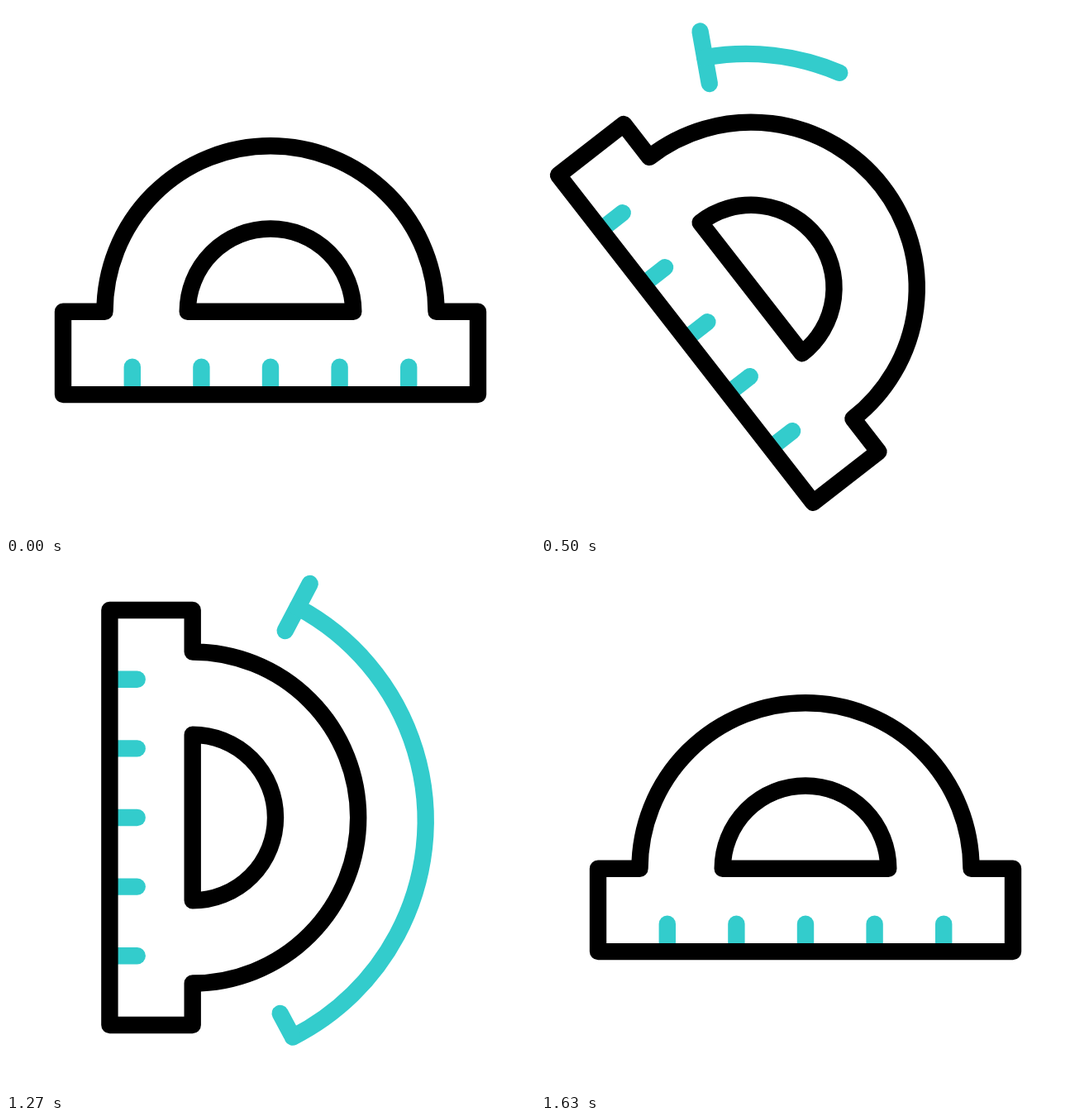
Animation, 640 px wide and 640 px high, one loop 1670 ms. Source, as an HTML page with a canvas:

```html
<!DOCTYPE html>
<html>
<head>
<meta charset="utf-8">
<style>
  html, body { margin: 0; width: 100%; height: 100%; overflow: hidden; background: #fff; }
  canvas { display: block; width: 100vw; height: 100vh; object-fit: contain; }
</style>
</head>
<body>
<canvas id="stage" width="640" height="640"></canvas>
<script>
const ctx = document.getElementById('stage').getContext('2d');
const LOOP = 1670, STEP = 100 / 3;
const BLACK = '#000', TEAL = '#33cccc';
const RAD = Math.PI / 180;

// Route of the middle of the ruler edge
const START = [320, 470], BEND = [81.7, 394.9], END = [125.5, 308];

// Angle gauge, relative to the centre of the protractor
const GAUGE = { x: 4, y: 11, r: 293, from: -151.9 * RAD, to: -26.8 * RAD };
const BAR = 64, ARC = GAUGE.r * (GAUGE.to - GAUGE.from), TOTAL = ARC + 2 * BAR;

const clamp = v => Math.min(1, Math.max(0, v));
const part = (t, a, b) => clamp((t - a) / (b - a));
const smooth = u => u * u * (3 - 2 * u);
const ease = (u, a, b) => 1 - Math.pow(1 - Math.pow(u, a), b);

function pose(n) {
  if (n <= 7) return { angle: -25.5 * smooth(n / 7), way: 0 };
  if (n <= 38) {
    const u = part(n, 7, 22);
    return { angle: -25.5 + 115.5 * ease(u, 1.1, 1.604), way: ease(u, 1.2, 1.44) };
  }
  const u = part(n, 39, 49);
  return { angle: 90 * (1 - smooth(u)), way: 1 - u };
}

function along(s) {
  const a = (1 - s) * (1 - s) * (1 + 2 * s), b = 3 * s * s * (1 - s), c = s * s * s;
  return START.map((p, i) => a * p + b * BEND[i] + c * END[i]);
}

function stroke(color, trace) {
  ctx.strokeStyle = color;
  ctx.beginPath();
  trace();
  ctx.stroke();
}

function bar(x1, y1, x2, y2, u) {
  if (u <= 0) return;
  stroke(TEAL, () => {
    ctx.moveTo(x1, y1);
    ctx.lineTo(x1 + (x2 - x1) * u, y1 + (y2 - y1) * u);
  });
}

function drawGauge(shown) {
  const len = shown * TOTAL;
  const sweep = clamp((len - BAR) / ARC);
  bar(-226, -112, -283, -142, clamp(len / BAR));
  if (sweep > 0) {
    const { x, y, r, from, to } = GAUGE;
    stroke(TEAL, () => ctx.arc(x, y, r, from, from + (to - from) * sweep));
  }
  bar(237, -106, 293, -136, clamp((len - BAR - ARC) / BAR));
}

function drawProtractor() {
  for (let i = -2; i <= 2; i++) bar(i * 83.6, 67, i * 83.6, 97, 1);
  stroke(BLACK, () => {
    ctx.moveTo(-251, 0);
    ctx.lineTo(-200.5, 0);
    ctx.arc(0, 0, 200.5, Math.PI, 2 * Math.PI);
    ctx.lineTo(251, 0);
    ctx.lineTo(251, 100.3);
    ctx.lineTo(-251, 100.3);
    ctx.closePath();
  });
  stroke(BLACK, () => {
    ctx.arc(0, 0, 100.3, Math.PI, 2 * Math.PI);
    ctx.closePath();
  });
}

function draw(ms) {
  const n = Math.floor((ms % LOOP + 4) / STEP);
  const { angle, way } = pose(n);
  ctx.setTransform(1, 0, 0, 1, 0, 0);
  ctx.fillStyle = '#fff';
  ctx.fillRect(0, 0, 640, 640);
  ctx.translate(...along(way));
  ctx.rotate(angle * RAD);
  ctx.translate(0, -100.2);
  ctx.lineWidth = 20.4;
  ctx.lineCap = ctx.lineJoin = 'round';
  drawProtractor();
  drawGauge(part(n, 12, 22) - part(n, 37.5, 48.5));
}

const begin = performance.now();
function tick() {
  draw(performance.now() - begin);
  requestAnimationFrame(tick);
}
tick();
</script>
</body>
</html>
```
